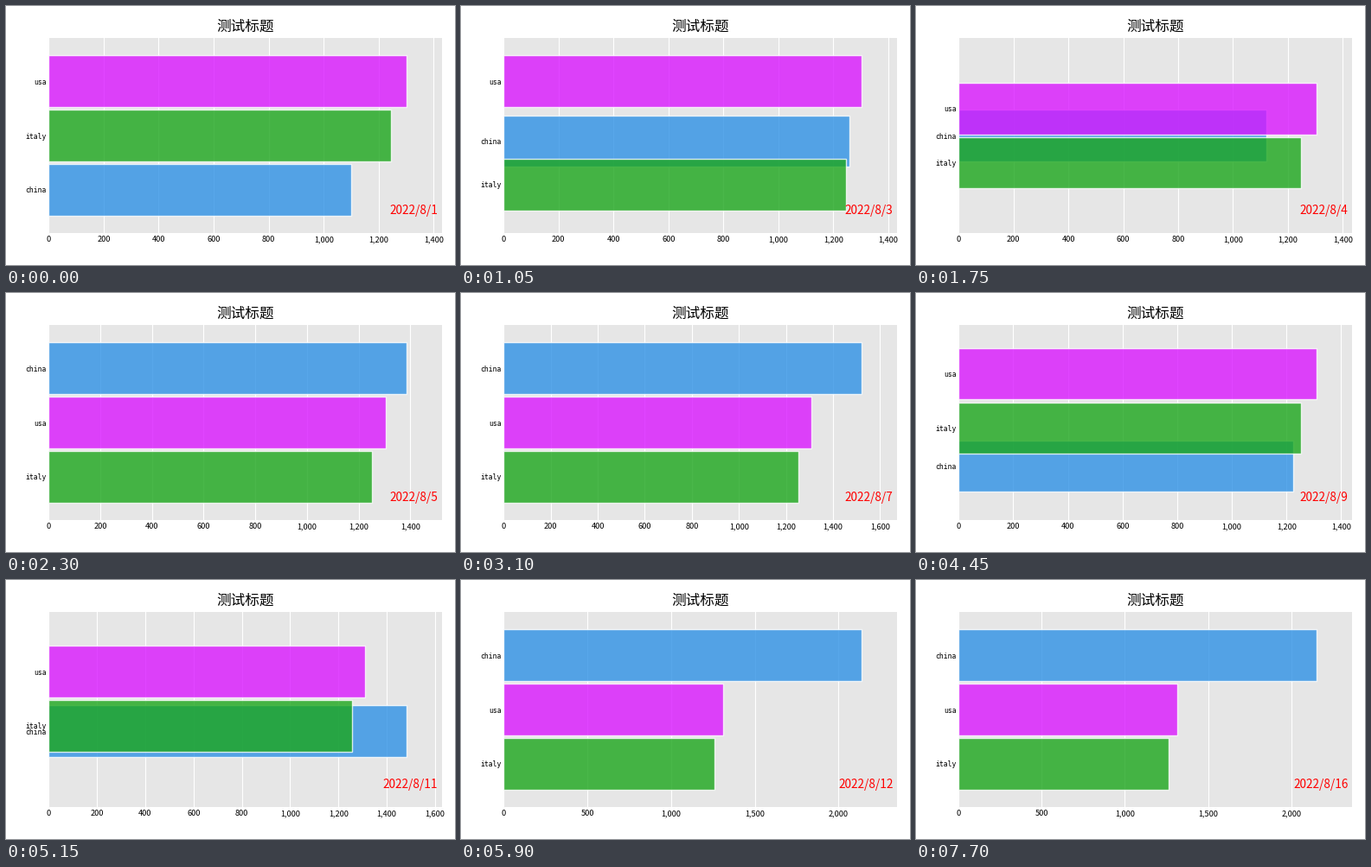
These frames come from a looping animation (519 by 300 pixels, 8000 ms). A matplotlib script:

```python
import numpy as np
import matplotlib.pyplot as plt
from matplotlib.animation import FuncAnimation

WIDTH, HEIGHT, DPI = 519, 300, 100
LEFT, RIGHT, TOP, BOTTOM = 49.222, 504.039, 37.0, 263.25
STEPS_PER_DAY = 10
FRAMES = 160

CJK = "Noto Sans CJK JP"
MONO = "DejaVu Sans Mono"

names = ["china", "italy", "usa"]
colors = ["#2E91E5", "#1CA71C", "#DA16FF"]

# Daily values, one column per country
days = np.arange(17)
china = [1100, 1200, 1300, 900, 1342, 1412, 1525, 1500, 1436,
         1200, 1220, 2090, 2147, 2148, 2149, 2150, 2151]
values = np.column_stack([china, 1245 + days, 1300 + days])
ranks = values.argsort(axis=1).argsort(axis=1) + 1


def at_day(table, t):
    return np.array([np.interp(t, days, column) for column in table.T])


fig = plt.figure(figsize=(WIDTH / DPI, HEIGHT / DPI), dpi=DPI, facecolor="white")
ax = fig.add_axes([LEFT / WIDTH, 1 - BOTTOM / HEIGHT,
                   (RIGHT - LEFT) / WIDTH, (BOTTOM - TOP) / HEIGHT])
ax.set_facecolor("0.9")
ax.set_axisbelow(True)
ax.grid(True, axis="x", color="white")
ax.spines[:].set_visible(False)
ax.tick_params(length=0, pad=2, labelsize=7)
ax.tick_params(axis="x", labelsize=6.6, labelfontfamily=CJK)
ax.tick_params(axis="y", labelsize=5.9, labelfontfamily=MONO)
ax.xaxis.set_major_formatter("{x:,.0f}")
ax.set_title("测试标题", fontfamily=CJK, fontsize=12)

bars = ax.barh(ranks[0], values[0], height=0.95, color=colors,
               edgecolor="white", alpha=0.8)
date = fig.text(499.4 / WIDTH, 1 - 241.5 / HEIGHT, "", color="red",
                ha="right", va="baseline", fontfamily=CJK, fontsize=9.8)


def update(frame):
    t = frame / STEPS_PER_DAY
    lengths, places = at_day(values, t), at_day(ranks, t)
    for bar, length, place in zip(bars, lengths, places):
        bar.set_width(length)
        bar.set_y(place - bar.get_height() / 2)
    ax.set_yticks(places, names)
    ax.set_ylim(0.2, len(names) + 0.8)
    ax.set_xlim(0, lengths.max() * 1.1)
    date.set_text(f"2022/8/{frame // STEPS_PER_DAY + 1}")
    return [*bars, date]


anim = FuncAnimation(fig, update, frames=FRAMES, interval=50,
                     repeat=True, repeat_delay=0, blit=False)
plt.show()
```
